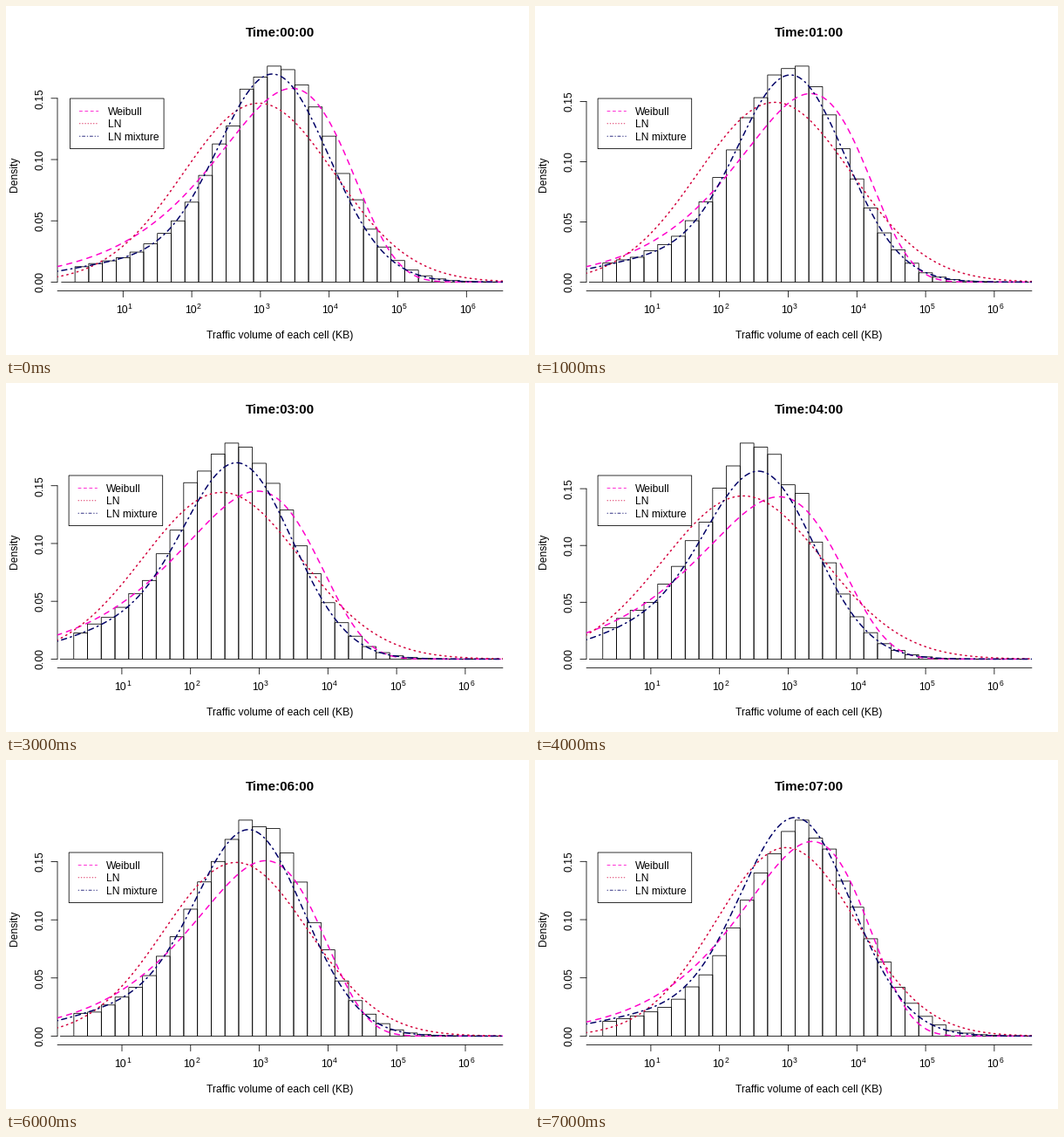
Recreate the animation shown at these times as a matplotlib script. Size 600 by 400 pixels, loop 8 s.

```python
import numpy as np
import matplotlib.pyplot as plt
from matplotlib.animation import FuncAnimation
from matplotlib.patches import Rectangle

W, H, DPI = 600, 400, 100
PX = 72 / DPI                       # one pixel in points
LEFT, RIGHT, TOP, BOTTOM = 59, 570, 59, 326.5
BASE, TALLEST = 316.4, 247.5        # baseline and height of the tallest bar
DECADE = 78.8
BIN = DECADE / 5
XS = np.arange(LEFT - 1, RIGHT + 2, 1.0)

STYLES = [
    ("Weibull", "#ff00cc", (0, (4, 4))),
    ("LN", "#d4003c", (0, (1, 3))),
    ("LN mixture", "#000066", (0, (1, 3, 4, 3))),
]

# hour: pixels per density 1, x of 10^1, lean of the bars,
# then mode, height and width of Weibull, LN and main mixture part
PARAMS = {
    0: (1404, 134.3, 4, 328, 222, 77, 290, 205, 87, 307, 235, 64),
    1: (1380, 132.9, 0, 316, 216, 74, 275, 206, 88, 295, 232, 62),
    2: (1347, 132.9, 1, 297, 199, 79, 256, 195, 89, 276, 225, 62),
    4: (1302, 132.9, 0, 280, 186, 80, 239, 187, 92, 261, 200, 62),
    5: (1187, 133.4, 0, 277, 182, 76, 239, 184, 84, 261, 210, 60),
    6: (1332, 133.0, 4, 298, 201, 74, 264, 199, 83, 281, 228, 62),
    7: (1334, 132.9, 9, 318, 223, 72, 288, 216, 81, 300, 246, 64),
}


def params(hour):
    columns = zip(*PARAMS.values())
    return [np.interp(hour, list(PARAMS), column) for column in columns]


def weibull(x, mode, height, width):
    """Weibull density over the logarithm of its variable."""
    z = (x - mode) / width
    return height * np.exp(1 + z - np.exp(z))


def bell(x, mode, height, width):
    return height * np.exp(-((x - mode) / width) ** 2 / 2)


def mixture(x, mode, height, width):
    """Main bell plus a wide, low one that grows as the mode moves left."""
    return bell(x, mode, height, width) + bell(x, 148, 0.35 * (370 - mode), 82)


def bar_heights(centres, hour, lean, main):
    noise = np.random.default_rng(hour).normal(1, 0.03, len(centres))
    heights = mixture(centres - lean, *main) * noise
    heights[0] = 0
    return heights * TALLEST / heights.max()


plt.rcParams["font.family"] = "Liberation Sans"
plt.rcParams["path.snap"] = False
fig = plt.figure(figsize=(W / DPI, H / DPI), dpi=DPI, facecolor="white")
ax = fig.add_axes([0, 0, 1, 1])


def text(x, y, s, size=12.1, ha="center", **kw):
    ax.text(x, y, s, fontsize=size * PX, ha=ha, va="baseline",
            rotation_mode="anchor", color="black", **kw)


def line(x0, y0, x1, y1):
    ax.plot([x0, x1], [y0, y1], color="black", lw=0.8 * PX,
            solid_capstyle="round")


def draw_axes(unit, tick):
    line(LEFT, BOTTOM, RIGHT, BOTTOM)
    for k in range(1, 7):
        x = tick + (k - 1) * DECADE
        line(x, BOTTOM, x, BOTTOM + 7.2)
        text(x - 8.4, 352, "10", ha="left")
        text(x + 5.4, 346.8, str(k), 8.6, ha="left")

    for k in range(int(TALLEST / unit / 0.05) + 1):
        y = BASE - 0.05 * k * unit
        line(LEFT - 7.2, y, LEFT, y)
        text(42.5, y, f"{0.05 * k:.2f}", rotation=90)
    line(LEFT, BASE, LEFT, y)

    text(314.4, 381, "Traffic volume of each cell (KB)")
    text(13, 192.8, "Density", rotation=90)


def draw_legend(x):
    ax.add_patch(Rectangle((x, 106), 107.6, 57.6, fc="white", ec="black",
                           lw=0.8 * PX, zorder=4))
    for k, (name, color, dash) in enumerate(STYLES):
        y = 120.4 + 14.4 * k
        ax.plot([x + 10.8, x + 32.4], [y, y], color=color, lw=0.8 * PX,
                ls=dash, dash_capstyle="round", zorder=5)
        text(x + 43.2, y + 4.4, name, ha="left", zorder=5)


def draw(hour):
    unit, tick, lean, *shape = params(hour)
    main = shape[6:]
    ax.clear()
    ax.set(xlim=(0, W), ylim=(H, 0))
    ax.axis("off")
    text(314.7, 35, f"Time:{hour:02d}:00", 15.1, weight="bold")
    draw_axes(unit, tick)

    area = Rectangle((LEFT, TOP), RIGHT - LEFT, BOTTOM - TOP,
                     transform=ax.transData)
    edges = tick - 0.9 * DECADE + BIN * np.arange(32)
    for x, height in zip(edges, bar_heights(edges + BIN / 2, hour, lean, main)):
        bar = ax.add_patch(Rectangle((x, BASE), BIN, -height, fill=False,
                                     ec="black", lw=0.8 * PX))
        bar.set_clip_path(area)

    curves = weibull(XS, *shape[:3]), bell(XS, *shape[3:6]), mixture(XS, *main)
    for curve, (_, color, dash) in zip(curves, STYLES):
        path, = ax.plot(XS, BASE - curve, color=color, lw=1.5 * PX, ls=dash,
                        dash_capstyle="round", zorder=3)
        path.set_clip_path(area)
    draw_legend(tick - 60.8)
    return []


anim = FuncAnimation(fig, draw, frames=8, interval=1000, repeat=True,
                     repeat_delay=0, init_func=lambda: [])
plt.show()
```
